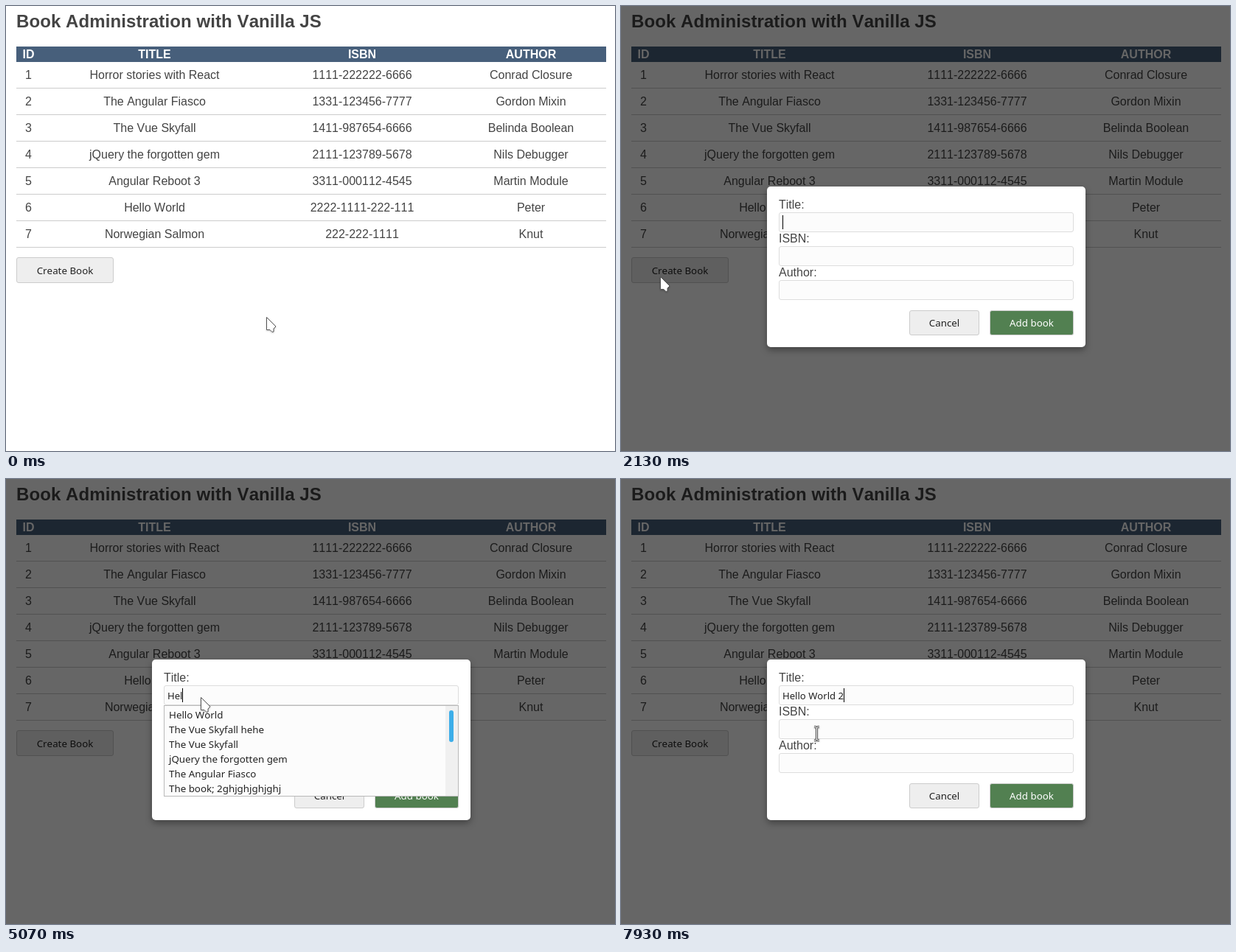
Animation, 826 px wide and 604 px high, one loop 8000 ms. Source, as an HTML page:

```html
<!DOCTYPE html>
<html lang="en">
<head>
<meta charset="utf-8">
<title>Book Administration</title>
<style>
  html, body { margin: 0; width: 100%; height: 100%; overflow: hidden; background: #fff; }
  * { box-sizing: border-box; }
  body { position: relative; font: 16px "Liberation Sans", Arial, sans-serif; font-kerning: none; color: #444; cursor: default; }
  h1, .table, .btn, .overlay, .modal, .label, .field, .list, .caret, .focus, .track, .thumb, #pointer { position: absolute; }
  h1 { left: 14px; top: 7px; margin: 0; font-size: 24px; line-height: 28px; letter-spacing: .09px; white-space: nowrap; }
  .table { left: 14px; top: 55px; width: 800px; }
  .row { display: grid; grid-template-columns: 33px 309px 254px 204px; height: 36px; line-height: 35px;
    text-align: center; border-bottom: 1px solid #ccc; }
  .row.head { height: 21px; line-height: 21px; border: 0; background: #475f7b; color: #fff; font-weight: bold; }
  .btn, .field, .list { font-family: "Noto Sans", "Open Sans", sans-serif; font-size: 13.333px; color: #222; white-space: pre; }
  .btn { border: 1px solid #ccc; border-radius: 3px; background: #eee; text-align: center; }
  .create { left: 14px; top: 341px; width: 132px; height: 35px; line-height: 34px; }
  .create.hover { background: #e1e1e1; }
  .focus { left: 25px; top: 7px; width: 81px; height: 19px; border: 1px dotted #222; }
  .overlay { inset: 0; background: rgba(0, 0, 0, .6); }
  .modal { left: 198px; top: 245px; width: 432px; height: 218px; border-radius: 5px; background: #fff;
    box-shadow: 0 4px 10px rgba(0, 0, 0, .35); }
  .label { left: 16px; line-height: 18px; }
  .field { left: 16px; width: 400px; height: 27px; padding-left: 4px; line-height: 26px; font-size: 13.1px;
    border: 1px solid #ddd; border-radius: 3px; background: #fcfcfc; }
  .caret { top: 3px; width: 1px; height: 19px; background: #000; }
  .cancel, .add { top: 168px; height: 34px; line-height: 32px; }
  .cancel { left: 193px; width: 95px; }
  .add { left: 302px; width: 114px; background: #528051; color: #fff; }
  .list { left: 16px; top: 62px; width: 400px; padding: 2px 6px; line-height: 20px; overflow: hidden;
    border: 1px solid #b9b9b9; background: #fcfcfc; }
  .track { right: 0; top: 0; width: 17px; height: 122px; background: #f0f0f0; }
  .thumb { left: 5px; top: 6px; width: 6px; border-radius: 3px; background: #3daee9; }
  #pointer { left: 0; top: 0; overflow: visible; filter: drop-shadow(0 1px 1px rgba(0, 0, 0, .25)); }
  [hidden] { display: none !important; }
</style>
</head>
<body>
<h1>Book Administration with Vanilla JS</h1>
<div class="table" id="table"></div>
<div class="btn create" id="create">Create Book<i class="focus" id="focus"></i></div>
<div class="overlay" id="overlay">
  <div class="modal">
    <div class="label" style="top:16px">Title:</div>
    <div class="field" style="top:35px"><span id="typed"></span><i class="caret" id="caret"></i></div>
    <div class="label" style="top:62px">ISBN:</div>
    <div class="field" style="top:81px"></div>
    <div class="label" style="top:108px">Author:</div>
    <div class="field" style="top:127px"></div>
    <div class="btn cancel">Cancel</div>
    <div class="btn add">Add book</div>
    <div class="list" id="list"><div id="items"></div>
      <div class="track" id="track"><div class="thumb" id="thumb"></div></div>
    </div>
  </div>
</div>
<svg id="pointer" width="1" height="1" fill="#fff" stroke="#555" stroke-linejoin="round">
  <path id="arrow" d="M.5 .5V17.5H5L8 20.5 10 20V16L13 13Z"/>
  <path id="hand" d="M-1 11V1.7Q-1 .5 .5 .5T2 1.7V7L10 9Q12 9.6 11.7 12L10.5 20.5H0L-8 11.5Q-7 8.7-5 9.5Z"/>
  <g id="beam" fill="none">
    <path stroke="#555" stroke-width="3" d="M-3-8.5H-1L.5-7.5 2-8.5H4M.5-7.5V8.5M-3 9.5H-1L.5 8.5 2 9.5H4"/>
    <path stroke="#fff" d="M-3-8.5H-1L.5-7.5 2-8.5H4M.5-7.5V8.5M-3 9.5H-1L.5 8.5 2 9.5H4"/>
  </g>
</svg>
<script>
const LOOP = 8000;
const $ = id => document.getElementById(id);

const books = [
  ['ID', 'TITLE', 'ISBN', 'AUTHOR'],
  [1, 'Horror stories with React', '1111-222222-6666', 'Conrad Closure'],
  [2, 'The Angular Fiasco', '1331-123456-7777', 'Gordon Mixin'],
  [3, 'The Vue Skyfall', '1411-987654-6666', 'Belinda Boolean'],
  [4, 'jQuery the forgotten gem', '2111-123789-5678', 'Nils Debugger'],
  [5, 'Angular Reboot 3', '3311-000112-4545', 'Martin Module'],
  [6, 'Hello World', '2222-1111-222-111', 'Peter'],
  [7, 'Norwegian Salmon', '222-222-1111', 'Knut'],
];
$('table').innerHTML = books.map((cells, i) =>
  `<div class="row${i ? '' : ' head'}">${cells.map(c => `<span>${c}</span>`).join('')}</div>`).join('');

const closed = { items: [], height: 0, thumb: 0 };
const allTitles = { height: 124, thumb: 30, items: ['tete', 'The Vue Skyfall', 'Hello World',
  'Horror stories with React2', 'jQuery the forgotten gem', 'ghj'] };
const matches = { height: 124, thumb: 43, items: ['Hello World', 'The Vue Skyfall hehe', 'The Vue Skyfall',
  'jQuery the forgotten gem', 'The Angular Fiasco', 'The book; 2ghjghjghjghj'] };
const oneMatch = { height: 24, thumb: 0, items: ['Hello World'] };

// Each track is a list of [start time, value]; values hold until the next step.
const pointerTrack = [
  [0, ['arrow', 353, 422]],
  [270, ['arrow', 340, 410]], [330, ['arrow', 290, 374]], [400, ['arrow', 215, 345]], [470, ['arrow', 150, 334]],
  [530, ['hand', 104, 342]], [600, ['hand', 74, 356]], [670, ['hand', 59, 364]], [730, ['hand', 53, 367]],
  [2130, ['arrow', 53, 367]],
  [2400, ['arrow', 75, 357]], [2470, ['arrow', 130, 330]], [2530, ['arrow', 205, 303]], [2600, ['beam', 265, 296]],
  [2930, ['arrow', 264, 296]], [6930, ['beam', 265, 296]],
  [7800, ['beam', 262, 318]], [7930, ['beam', 265, 345]],
];
const textTrack = [
  [0, ''], [5070, 'Hel'], [5200, 'Hell'], [5400, 'Hello'], [5470, 'Hello '], [5670, 'Hello W'],
  [6400, 'Hello Wo'], [6470, 'Hello Wor'], [6600, 'Hello Worl'], [6670, 'Hello World'],
  [6930, 'Hello World '], [7000, 'Hello World 2'],
];
const caretTrack = [[0, true], [2730, false], [4130, true], [6270, false], [6400, true]];
const listTrack = [[0, closed], [2930, allTitles], [5070, matches], [5200, oneMatch], [6930, closed]];

const at = (track, t) => track.findLast(step => step[0] <= t)[1];

function showList(list) {
  $('list').hidden = !list.height;
  $('list').style.height = list.height + 'px';
  $('items').textContent = list.items.join('\n');
  $('track').hidden = !list.thumb;
  $('thumb').style.height = list.thumb + 'px';
}

function render(t) {
  const [shape, x, y] = at(pointerTrack, t);
  for (const id of ['arrow', 'hand', 'beam']) $(id).style.display = id === shape ? '' : 'none';
  $('pointer').style.transform = `translate(${x}px, ${y}px)`;
  $('create').classList.toggle('hover', shape === 'hand');
  $('focus').hidden = t < 1600 || t >= 2130;
  $('overlay').hidden = t < 2130;
  $('typed').textContent = at(textTrack, t);
  $('caret').hidden = !at(caretTrack, t);
  showList(at(listTrack, t));
}

const start = performance.now();
function tick() {
  render((performance.now() - start) % LOOP);
  requestAnimationFrame(tick);
}
tick();
</script>
</body>
</html>
```
